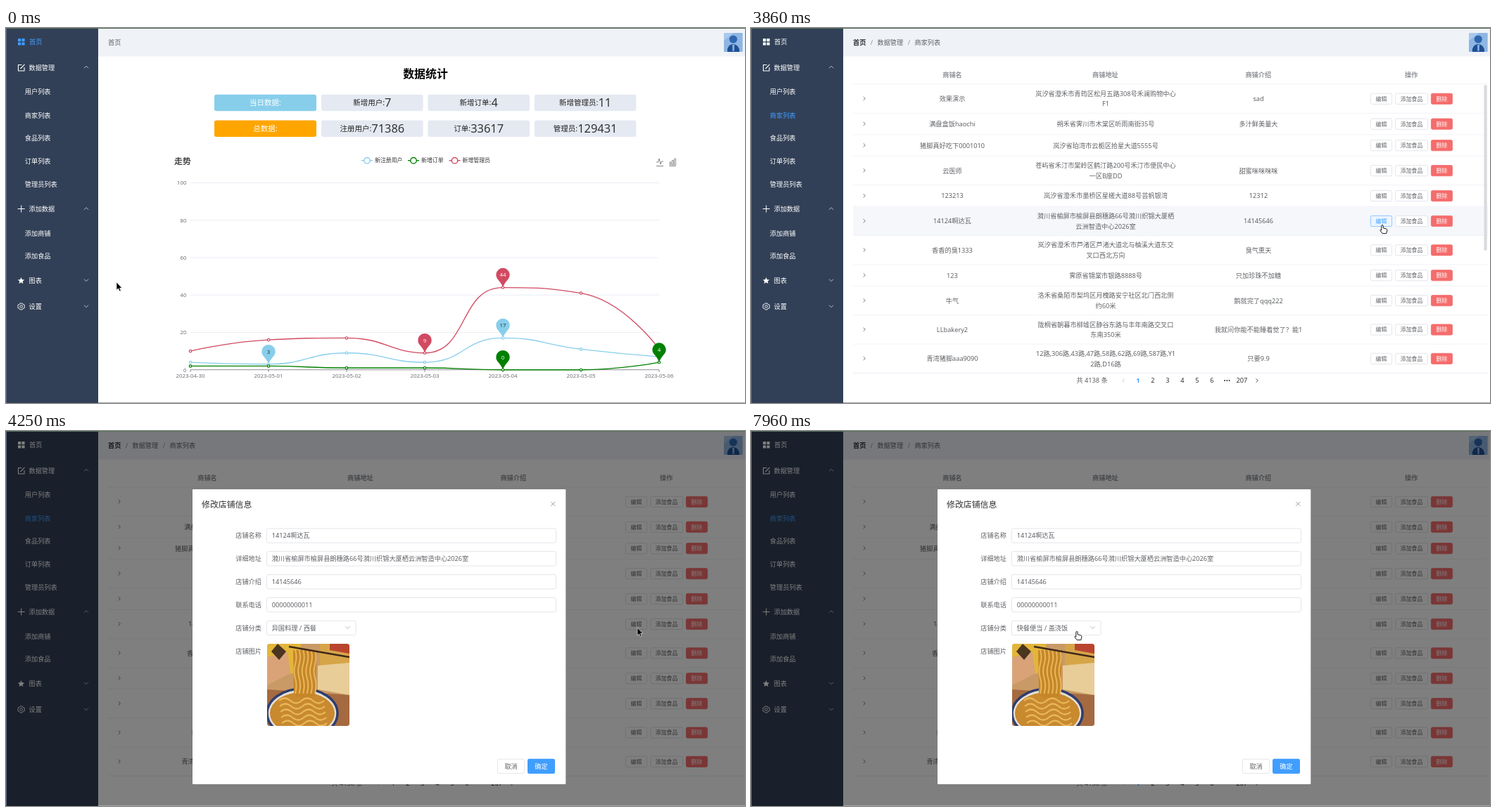
An HTML page for the animation above (8000 ms loop, 1050 by 534 pixels).

```html
<!DOCTYPE html>
<html lang="zh-CN">
<head>
<meta charset="utf-8">
<title>管理后台</title>
<style>
  html, body { margin: 0; width: 100%; height: 100%; overflow: hidden; background: #fff; }
  svg { display: block; width: 100vw; height: 100vh; font-family: "Noto Sans", "Noto Sans CJK SC", "Noto Sans CJK", sans-serif; }
</style>
</head>
<body>
<svg id="stage" viewBox="0 0 1050 534" lang="zh-CN"></svg>
<script>
const LOOP = 8000, STEP = 1000 / 7.5, LAG = 26;
const BLUE = '#409eff', GREY = '#606266', LINE = '#ebeef5', BORDER = '#dcdfe6';

// Drawing helpers; text is placed by its vertical centre, strokes of boxes lie inside.
const text = (x, y, s, fill = GREY, size = 9.2, anchor = 'start', weight = 400) =>
  `<text x="${x}" y="${y + size * .37}" fill="${fill}" font-size="${size}" text-anchor="${anchor}" font-weight="${weight}">${s}</text>`;
const mid = (x, y, s, fill, size, weight) => text(x, y, s, fill, size, 'middle', weight);
const rect = (x, y, w, h, fill, rx = 0) =>
  `<rect x="${x}" y="${y}" width="${w}" height="${h}" rx="${rx}" fill="${fill}"/>`;
const box = (x, y, w, h, fill, rx, stroke) =>
  `<rect x="${x + .4}" y="${y + .4}" width="${w - .8}" height="${h - .8}" rx="${rx}" fill="${fill}" stroke="${stroke}" stroke-width=".8"/>`;
const path = (d, stroke, width = 1, fill = 'none') =>
  `<path d="${d}" stroke="${stroke}" stroke-width="${width}" fill="${fill}"/>`;
const shape = (d, fill) => `<path d="${d}" fill="${fill}"/>`;
const circle = (x, y, r, fill, stroke = 'none', width = 1) =>
  `<circle cx="${x}" cy="${y}" r="${r}" fill="${fill}" stroke="${stroke}" stroke-width="${width}"/>`;
const chevron = (x, y, turn, color, size = 3) =>
  `<path transform="translate(${x} ${y}) rotate(${turn})" d="M${-size} ${size / 2}L0 ${-size / 2}L${size} ${size / 2}" fill="none" stroke="${color}" stroke-width=".9"/>`;
const hline = (x1, x2, y, color) => path(`M${x1} ${y}H${x2}`, color, .7);

// Cursor path: step, x, y
const track = [
  [1, 157, 362], [3, 168, 335], [5, 165, 270], [7, 140, 190], [9, 73, 142],
  [10, 69, 122], [15, 69, 122], [16, 100, 135], [17, 155, 164], [19, 300, 190],
  [22, 640, 280], [24, 908, 305], [25, 897, 280], [32, 897, 280], [36, 478, 238],
  [37, 470, 262], [39, 463, 283], [45, 463, 283], [49, 447, 333], [50, 447, 333],
  [53, 520, 339], [55, 520, 339], [57, 500, 310], [59, 463, 285]
];
function cursorAt(n) {
  const i = track.findIndex(k => k[0] >= n);
  if (i < 0) return track.at(-1).slice(1);
  if (!i) return track[0].slice(1);
  const [a, b] = [track[i - 1], track[i]], f = (n - a[0]) / (b[0] - a[0]);
  return [a[1] + (b[1] - a[1]) * f, a[2] + (b[2] - a[2]) * f];
}
function cursor(n, [x, y]) {
  const hand = n >= 10 && x < 131 || n >= 25 && n < 30 || n >= 38;
  const icon = hand
    ? path('M-1.2 1.3Q0 -.7 1.2 1.3V4.8L5.8 6Q7.2 6.6 6.8 8.6L5.8 12.6H.2L-3.2 8.2Q-2.9 6.5 -1.2 8Z', '#000', .9, '#fff')
    : path('M0 0V11L2.6 8.9L4.4 13L6.2 12.2L4.5 8.3H7.8Z', '#fff', .6, '#000');
  return `<g transform="translate(${x} ${y})">${icon}</g>`;
}

function sidebar(n) {
  const home = n < 12, hover = n >= 10 && n < 17, w = '#fff', c = home ? BLUE : w;
  let s = rect(0, 0, 131, 534, '#324057');
  if (hover) s += rect(0, 107.5, 131, 33, '#283346');
  for (const [x, y] of [[17, 15], [22.4, 15], [17, 20.4], [22.4, 20.4]]) s += rect(x, y, 4.2, 4.2, c, .4);
  s += text(33, 20, '首页', c);
  s += path('M22.5 52.5H17.5V61H26V56M20.5 58L26.5 51.8', w, 1.1);
  s += path('M21.7 252.5V262.5M16.7 257.5H26.7', w, 1);
  const star = Array.from({ length: 10 }, (_, i) => {
    const a = i * Math.PI / 5, r = i % 2 ? 2.3 : 5;
    return [21.5 + r * Math.sin(a), 360 - r * Math.cos(a)];
  });
  s += shape(`M${star.join('L')}Z`, w);
  s += path('M20 392H23.2L24 393.6L26.2 394.2V398.8L24 399.4L23.2 401H20L19 399.4L17 398.8V394.2L19 393.6Z', w, .9) + circle(21.6, 396.5, 1.8, 'none', w, .9);
  [['数据管理', 56.5, 0], ['添加数据', 258, 0], ['图表', 360, 180], ['设置', 397, 180]].forEach(([label, y, turn]) => {
    s += text(32.5, y, label, w) + chevron(114, y - .8, turn, '#c6ccd6');
  });
  [['用户列表', 91], ['商家列表', 124.5], ['食品列表', 157], ['订单列表', 190], ['管理员列表', 222.7], ['添加商铺', 292.7], ['添加食品', 325]].forEach(([label, y], i) => {
    s += text(26.8, y, label, i === 1 && !home ? (n < 14 ? '#66b1ff' : BLUE) : w);
  });
  return s;
}

function header(home) {
  let s = rect(131, 0, 919, 40.5, '#eff2f7');
  if (home) s += text(145, 21, '首页');
  else s += text(145, 21, '首页', '#303133', 9.2, 'start', 700) + mid(171.5, 21, '/', '#909399')
    + text(179.5, 21, '数据管理') + mid(224.5, 21, '/', '#909399') + text(232.5, 21, '商家列表');
  s += rect(1020, 7, 26.5, 27, '#a9c9ec', 1) + shape('M1020 34V18L1034 7H1046.5V34Z', '#8fb6e2');
  s += shape('M1025 34Q1024 24 1033 23Q1042.5 24 1042 34Z', '#1f4f93') + circle(1033.3, 16, 5.6, '#2e66b0');
  return s + shape('M1032 24H1035L1034.5 33H1032.5Z', '#8db8e8');
}

// Smooth line whose control points never leave the span between neighbours.
function smooth(p) {
  const dist = (a, b) => Math.hypot(a[0] - b[0], a[1] - b[1]);
  const clamp = (v, a, b) => v.map((k, i) => Math.max(Math.min(a[i], b[i]), Math.min(Math.max(a[i], b[i]), k)));
  let d = `M${p[0]}`, from = p[0];
  for (let i = 1; i < p.length; i++) {
    const prev = p[i - 1], cur = p[i], next = p[i + 1];
    let into = cur, out = cur;
    if (next) {
      const d0 = dist(cur, prev), d1 = dist(cur, next), r = .5 * d1 / (d0 + d1);
      out = clamp(cur.map((k, j) => k + (next[j] - prev[j]) * r), cur, next);
      into = clamp(cur.map((k, j) => k - (out[j] - k) * d0 / d1), prev, cur);
      out = cur.map((k, j) => k + (k - into[j]) * d1 / d0);
    }
    d += `C${from} ${into} ${cur}`;
    from = out;
  }
  return d;
}

function dashboard() {
  let s = mid(596, 65, '数据统计', '#000', 15.9, 700);
  const boxes = [
    [106.5, '#87ceeb', '当日数据:', ['新增用户:', 7], ['新增订单:', 4], ['新增管理员:', 11]],
    [143.3, '#ffa500', '总数据:', ['注册用户:', 71386], ['订单:', 33617], ['管理员:', 129431]]
  ];
  for (const [y, color, name, ...cells] of boxes) {
    s += rect(296, y - 11.8, 145, 23.6, color, 3) + mid(368.5, y, name, '#fff', 10.5);
    cells.forEach(([label, value], i) => {
      const x = 448 + i * 151.4;
      s += rect(x, y - 11.8, 144.6, 23.6, '#e5e9f2', 3);
      s += mid(x + 72.3, y, `${label}<tspan font-size="16.4" dy="1.8" fill="#333">${value}</tspan>`, '#222', 10.5);
    });
  }
  s += text(239, 190, '走势', '#464646', 11.9, 'start', 700);
  s += path('M924 191H926.5L928 186L930 194L931.5 190H934M924 196.5H934', '#777', .9);
  s += path('M943 191H945V195H943ZM946.3 188.5H948.3V195H946.3ZM949.6 186H951.6V195H949.6ZM942.5 196.5H952', '#777', .8);
  const px = i => 262 + i * 111, py = v => 486.7 - v * 2.662;
  for (let v = 0; v <= 100; v += 20) {
    if (v) s += hline(262, 928, py(v), '#e0e6f1');
    s += text(256.5, py(v), v, '#6e7079', 7.9, 'end');
  }
  s += path('M262 486.7H928', '#6e7079', .8);
  for (let i = 0; i < 7; i++) {
    s += path(`M${px(i)} 486.7v3.3`, '#6e7079', .8);
    s += mid(px(i), 495.5, i ? `2023-05-0${i}` : '2023-04-30', '#6e7079', 7.9);
  }
  const series = [
    ['新注册用户', 505, '#87ceeb', [4, 3, 9, 4, 17, 11, 7], [1, 4], '#333'],
    ['新增订单', 571, '#008000', [2, 2, 1, 1, 0, 0, 4], [4, 6], '#fff'],
    ['新增管理员', 629.5, '#d14a61', [10, 16, 17, 9, 44, 41, 11], [3, 4], '#fff']
  ];
  let pins = '';
  for (const [name, x, color, values, marks, ink] of series) {
    const pts = values.map((v, i) => [px(i), py(v)]);
    s += path(`M${x} 188.7h16`, color, 1.4) + circle(x + 8, 188.7, 4.2, '#fff', color, 1.4) + text(x + 19, 188.5, name, '#333', 7.9);
    s += path(smooth(pts), color, 1.35) + pts.map(p => circle(...p, 1.7, '#fff', color, 1.2)).join('');
    for (const i of marks) {
      const [cx, cy] = pts[i];
      pins += shape(`M${cx - 8.3} ${cy - 13}A9.7 9.7 0 1 1 ${cx + 8.3} ${cy - 13}Q${cx + 3} ${cy - 7} ${cx} ${cy - 1}Q${cx - 3} ${cy - 7} ${cx - 8.3} ${cy - 13}Z`, color);
      pins += mid(cx, cy - 18, values[i], ink, 7.9);
    }
  }
  return s + pins;
}

const shops = [
  ['效果演示', '岚汐省澄禾市青筠区松月五路308号禾澜购物中心|F1', 'sad'],
  ['满盘盒饭haochi', '朔禾省霁川市木棠区听雨南街35号', '多汁鲜美量大'],
  ['猪脚真好吃下0001010', '岚汐省珀湾市云栀区拾星大道5555号', ''],
  ['云医师', '苍屿省禾汀市棠岭区鹤汀路200号禾汀市便民中心|一区B座DD', '甜蜜咪咪咪咪'],
  ['123213', '岚汐省澄禾市墨桥区星槎大道88号芸帆银湾', '12312'],
  ['14124啊达瓦', '漪川省榆屏市榆屏县朗穗路66号漪川织锦大厦栖|云洲智造中心2026室', '14145646'],
  ['香香的臭1333', '岚汐省澄禾市芦渚区芦渚大道北与柚溪大道东交|叉口西北方向', '臭气熏天'],
  ['123', '霁原省锦棠市银路8888号', '只加珍珠不加糖'],
  ['牛气', '洛禾省桑陌市梨坞区月槐路安宁社区北门西北侧|约60米', '鹅就完了qqq222'],
  ['LLbakery2', '陇桐省朝暮市柳墟区静谷东路与丰年南路交叉口|东南350米', '我就问你能不能睡着觉了？能1'],
  ['青湾猪脚aaa9090', '12路,306路,43路,47路,58路,62路,69路,587路,Y1|2路,D16路', '只要9.9']
];

function button(x, y, w, label, ink = GREY, fill = '#fff', stroke = BORDER) {
  return box(x, y - 8, w, 16, fill, 2, stroke) + mid(x + w / 2, y, label, ink, 7.9);
}

function table(n, [cx, cy]) {
  let s = '';
  ['商铺名', '商铺地址', '商铺介绍', '操作'].forEach((label, i) => s += mid(286 + i * 217.4, 67, label, '#909399', 9.2, 700));
  s += hline(145, 1047, 79.7, LINE);
  if (n < 14) s += mid(596, 286, '暂无数据', '#909399');
  else {
    let top = 80;
    shops.forEach(([name, address, intro], i) => {
      const lines = address.split('|'), h = lines.length > 1 ? 41.35 : 30.5, y = top + h / 2 + .1;
      if (n >= 17 && n < 30 && cx > 145 && cy >= top && cy < top + h) s += rect(145, top, 902, h, '#f5f7fa');
      s += chevron(161, y - .3, 90, '#666', 2.6) + mid(286, y, name) + mid(721, y, intro);
      lines.forEach((line, k) => s += mid(504, y + (k - (lines.length - 1) / 2) * 14.6, line));
      const hot = i === 5 && n >= 25 && n < 30, cooling = i === 5 && n === 30;
      s += hot ? button(880, y, 31, '编辑', n === 25 ? '#5382b5' : BLUE, '#ecf5ff', '#79bbff')
        : cooling ? button(880, y, 31, '编辑', '#527eaf', '#f6faff', '#b3d0ee') : button(880, y, 31, '编辑');
      s += button(915.3, y, 46.6, '添加食品') + button(966, y, 31, '删除', '#fff', '#f56c6c', '#f56c6c');
      top += h;
      s += hline(145, 1047, top, LINE);
    });
  }
  if (n >= 17 && n < 32) s += rect(1041.5, 81, 4.2, 236, '#d9dadd', 2);
  s += hline(145, 1047, 491, LINE) + text(462.5, 502, '共 4138 条');
  s += chevron(529, 502, -90, '#c0c4cc', 2.6) + chevron(719, 502, 90, '#303133', 2.6);
  for (let i = 1; i < 7; i++) s += mid(529 + i * 21, 502, i, i === 1 ? BLUE : '#303133', 9.2, i === 1 ? 700 : 400);
  for (const x of [673, 676.3, 679.6]) s += circle(x, 502, 1, '#303133');
  return s + mid(697.3, 502, 207, '#303133');
}

// A bowl of noodles in a few flat shapes.
function photo() {
  let s = rect(371, 303, 117, 117, '#c99a66');
  s += shape('M371 303H420L408 345L371 352Z', '#e3b53a') + shape('M371 322L400 315L404 345L371 362Z', '#d9a377');
  s += shape('M386 303L398 314L388 326L377 314Z', '#4a3520') + shape('M446 303H488V334H446Z', '#d6a548');
  s += shape('M460 303H488V317L460 312Z', '#b9452f') + shape('M443 334L488 330V376L443 368Z', '#e9cd98');
  s += shape('M371 368L488 376V420H371Z', '#a56a3f');
  s += '<ellipse cx="421" cy="402" rx="50" ry="35" fill="#e4dfd2" stroke="#2f3d70" stroke-width="3.5"/>';
  s += '<ellipse cx="421" cy="402" rx="46" ry="30" fill="#c8892f"/>';
  s += shape('M408 312H442L439 376Q424 384 409 376Z', '#c58628');
  for (let i = 0; i < 6; i++) s += path(`M${411 + i * 5.6} 312q3 10 0 20t0 20t0 22`, '#e8b659', 2);
  for (let i = 0; i < 5; i++) s += path(`M${388 + i} ${384 + i * 8}q8 -7 16 0t16 0t16 0t16 0`, '#e8b659', 2.2);
  s += path('M402 307L488 322', '#3f291a', 2.6);
  return `<clipPath id="photo"><rect x="371" y="303" width="117" height="117" rx="4"/></clipPath><g clip-path="url(#photo)">${s}</g>`;
}

const kinds = ['异国料理', '快餐便当', '小吃夜宵', '果蔬生鲜', '特色菜系', '商店超市'];
const dishes = [['日韩料理', '西餐', '披萨意面', '东南亚菜'], ['简餐', '盖浇饭', '米粉面馆', '包子粥店', '香锅砂锅', '麻辣烫']];

function dropdown(n, [cx, cy]) {
  const open = n < 49 ? 0 : 1, shown = n === 43 || n === 55 ? .5 : 1, rowY = i => 314.5 + i * 22.35;
  let s = '<rect x="370" y="298.5" width="238" height="136" rx="3" fill="none" stroke="#000" stroke-opacity=".06" stroke-width="3"/>';
  s += box(370, 298.6, 238, 135.4, '#fff', 2.5, '#e4e7ed') + path('M393 299.4L397.5 295.5L402 299.4', '#e4e7ed', .6, '#fff');
  let list = '';
  if (cy > 303.3) list += rect(cx < 489 ? 371 : 489.5, rowY(Math.floor((cy - 303.3) / 22.35)) - 11.2, 117.5, 22.3, '#f5f7fa');
  kinds.forEach((k, i) => {
    const on = i === open;
    list += text(389, rowY(i), k, on ? BLUE : GREY, 9.2, 'start', on ? 700 : 400) + chevron(477.5, rowY(i) - .3, 90, on ? BLUE : GREY, 2.8);
  });
  dishes[open].forEach((k, i) => {
    const on = i === 1 && (!open || n >= 55);
    list += text(507, rowY(i), k, on ? BLUE : GREY, 9.2, 'start', on ? 700 : 400);
    if (on) list += path(`M498 ${rowY(i)}l2.2 2.2l4 -4.2`, BLUE, .9);
  });
  s += `<clipPath id="list"><rect x="371" y="299.5" width="236" height="133.7"/></clipPath><g clip-path="url(#list)">${list}</g>` + path('M489 299.5V433', '#e4e7ed', .7);
  return `<g opacity="${shown}" transform="translate(0 ${297 * (1 - shown) * .6}) scale(1 ${1 - (1 - shown) * .6})">${s}</g>`;
}

function dialog(n, pos) {
  const open = n >= 43 && n < 56;
  let s = rect(265, 83, 530.3, 420, '#fff', 1.3) + text(278, 104.3, '修改店铺信息', '#303133', 11.9);
  s += path('M774.3 100.8l6 6m0 -6l-6 6', '#909399', .9);
  const fields = [
    ['店铺名称', '14124啊达瓦'], ['详细地址', '漪川省榆屏市榆屏县朗穗路66号漪川织锦大厦栖云洲智造中心2026室'],
    ['店铺介绍', '14145646'], ['联系电话', '00000000011'],
    ['店铺分类', n < 55 ? '异国料理 / 西餐' : '快餐便当 / 盖浇饭'], ['店铺图片']
  ];
  fields.forEach(([label, value], i) => {
    const y = 149 + i * 32.85, select = i === 4;
    s += text(363, y, label, GREY, 9.2, 'end');
    if (!value) return;
    const edge = select && open ? BLUE : select && n >= 38 && n < 43 ? '#c0c4cc' : BORDER;
    s += box(370, y - 10.6, select ? 127.4 : 412, 21.2, '#fff', 2.6, edge) + text(377.7, y, value);
  });
  s += chevron(485.3, 280, open ? 0 : 180, '#a8abb2', 3.2) + photo();
  s += box(698, 466.8, 39, 21.2, '#fff', 2.5, BORDER) + mid(717.6, 477.5, '取消');
  s += rect(741, 466.8, 39, 21.2, BLUE, 2.5) + mid(760.5, 477.5, '确定', '#fff');
  return s + (open ? dropdown(n, pos) : '');
}

function scene(n) {
  const pos = cursorAt(n), home = n < 12;
  let s = rect(0, 0, 1050, 534, '#fff') + sidebar(n) + header(home) + (home ? dashboard() : table(n, pos));
  if (n >= 30) s += `<g opacity="${n === 30 ? .08 : n === 31 ? .36 : .5}">${rect(0, 0, 1050, 534, '#000')}</g>`;
  if (n >= 31) s += n === 31 ? `<g opacity=".65" transform="translate(0 -5)">${dialog(n, pos)}</g>` : dialog(n, pos);
  s += rect(0, 0, 1050, 1, '#55705a') + rect(0, 1, 1, 533, '#5c6788') + rect(131, 533, 919, 1, '#a5a8a6');
  return s + cursor(n, pos);
}

const stage = document.getElementById('stage');
let shownStep = -1;
function frame(now) {
  const step = Math.floor((now % LOOP + LAG) / STEP);
  if (step !== shownStep) stage.innerHTML = scene(shownStep = step);
  requestAnimationFrame(frame);
}
frame(0);
</script>
</body>
</html>
```
